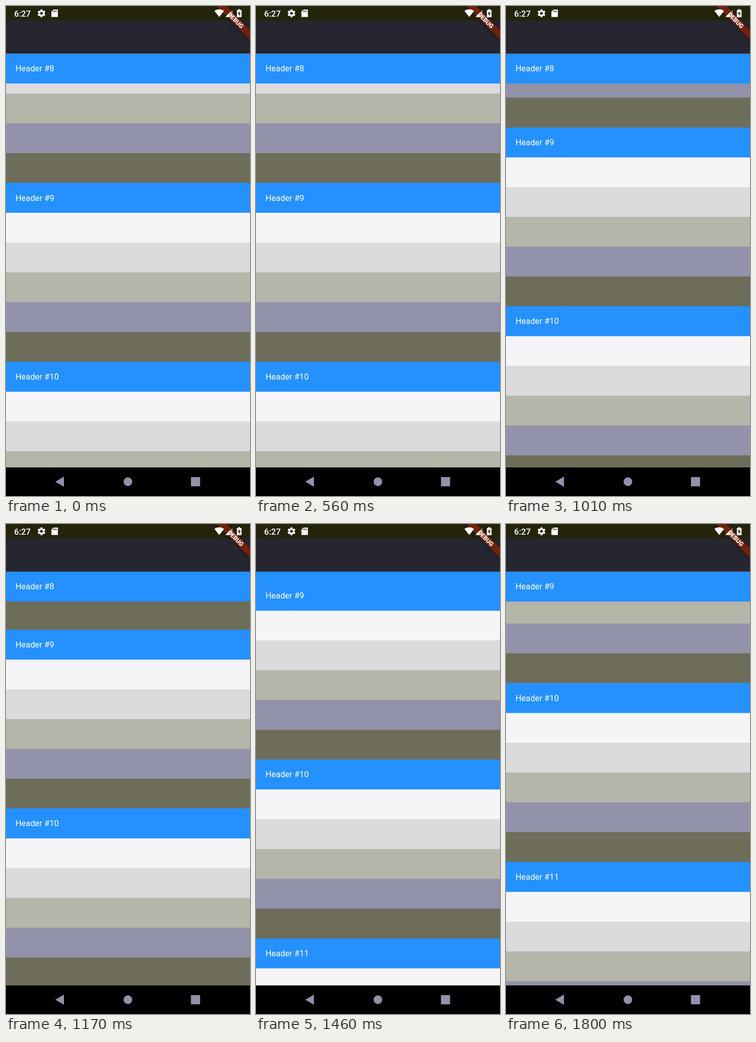
Animation of 480x960 px, one loop 1920 ms. Source, as an HTML page with a canvas:

```html
<!DOCTYPE html>
<html>
<head>
<meta charset="utf-8">
<style>
html, body { margin: 0; width: 100%; height: 100%; overflow: hidden; background: #000; }
canvas { display: block; width: 480px; height: 960px; }
</style>
</head>
<body>
<canvas id="stage" width="480" height="960"></canvas>
<script>
const ctx = document.getElementById('stage').getContext('2d');
const DP = 480 / 411, ROW = 50 * DP, SECTION = 6 * ROW, TOP = 80 * DP;
const LOOP = 1920, TICK = 41.5;
const STATUS = '#24240a', ICON = '#9191aa';
const ROWS = ['#2491ff', '#f5f5f8', '#dbdbde', '#b5b5aa', '#9292aa', '#6d6d5a'];

// Drag path: time and top of header 9
const PATH = [[560, 346.7], [760, 295.2], [1010, 238], [1340, 146.7], [1590, 32], [1800, -38.6]];

function speed(i) {
  const [ta, ya] = PATH[Math.max(i - 1, 0)];
  const [tb, yb] = PATH[Math.min(i + 1, PATH.length - 1)];
  return (yb - ya) / (tb - ta);
}

// Smooth curve through the path, held for one tick at a time
function scrollAt(t) {
  const next = PATH.findIndex(([time]) => t < time);
  if (next === 0) return PATH[0][1];
  if (next < 0) return PATH[PATH.length - 1][1];
  const [t0, y0] = PATH[next - 1], [t1, y1] = PATH[next], span = t1 - t0;
  const ticks = Math.round(span / TICK);
  const u = Math.floor((t - t0) / span * ticks) / ticks, w = 1 - u;
  return w * w * (1 + 2 * u) * y0 + u * u * (1 + 2 * w) * y1
    + span * u * w * (w * speed(next - 1) - u * speed(next));
}

function rect(color, x, y, w, h) {
  ctx.fillStyle = color;
  ctx.fillRect(x, y, w, h);
}

function disc(color, x, y, r) {
  ctx.fillStyle = color;
  ctx.beginPath();
  ctx.arc(x, y, r, 0, 7);
  ctx.fill();
}

// Right triangle with its square corner at x, y
function corner(color, x, y, dx, dy) {
  ctx.fillStyle = color;
  ctx.beginPath();
  ctx.moveTo(x, y);
  ctx.lineTo(x + dx, y);
  ctx.lineTo(x, y + dy);
  ctx.fill();
}

function text(str, x, y, font, align = 'left') {
  ctx.font = font + ' Roboto, sans-serif';
  ctx.textAlign = align;
  ctx.fillStyle = '#fff';
  ctx.fillText(str, x, y);
}

function drawList(y9) {
  const topOf = n => y9 + (n - 9) * SECTION;
  for (let n = 8; n < 12; n++) {
    ROWS.forEach((color, i) => rect(color, 0, topOf(n) + i * ROW, 480, ROW + 1));
  }
  // Each header sticks to the top until the next one pushes it away
  for (let n = 8; n < 12; n++) {
    const y = Math.max(topOf(n), Math.min(TOP, topOf(n + 1) - ROW));
    rect(ROWS[0], 0, y, 480, ROW);
    text('Header #' + n, 16 * DP, y + 34.8, 14 * DP + 'px');
  }
}

function gear(x, y) {
  ctx.save();
  ctx.translate(x, y);
  disc('#fff', 0, 0, 5.8);
  for (let i = 0; i < 6; i++) {
    rect('#fff', -2, -7.7, 4, 4);
    ctx.rotate(Math.PI / 3);
  }
  disc(STATUS, 0, 0, 2.7);
  ctx.restore();
}

function sdCard(x, y) {
  rect('#fff', x, y, 12.7, 14.5);
  corner(STATUS, x, y, 4.3, 4.3);
  for (let i = 0; i < 3; i++) rect(STATUS, x + 4 + i * 2.5, y + 2, 1.3, 3);
}

function wifi(x, y) {
  ctx.fillStyle = '#fff';
  ctx.beginPath();
  ctx.moveTo(x, y);
  ctx.arc(x, y, 15, -2.25, -.89);
  ctx.fill();
}

function battery(x, y) {
  rect('#fff', x - 4.6, y - 6, 9.2, 14);
  rect('#fff', x - 2, y - 7.7, 4, 2);
  corner(STATUS, x + .5, y + 1.5, -3.4, -6);
  corner(STATUS, x - .5, y, 3.4, 6);
}

function onRibbon(paint) {
  ctx.save();
  ctx.translate(480, 0);
  ctx.rotate(Math.PI / 4);
  paint();
  ctx.restore();
}

function drawStatus() {
  rect('#262630', 0, 0, 480, TOP);
  rect(STATUS, 0, 0, 480, 24 * DP);
  text('6:27', 16, 20.5, '500 16.5px');
  gear(69.8, 14.3);
  sdCard(89.3, 7);
  onRibbon(() => {
    ctx.shadowColor = 'rgba(0,0,0,.5)';
    ctx.shadowBlur = 6 * DP;
    rect('#70220c', -40 * DP, 28 * DP, 80 * DP, 12 * DP);
  });
  wifi(419.5, 21.5);
  corner('rgba(255,255,255,.35)', 446, 21.5, -14.5, -14.5);
  corner('#fff', 440, 21.5, -8.5, -8.5);
  battery(458.8, 14);
  onRibbon(() => text('DEBUG', 0, 37.6 * DP, `900 ${10.2 * DP}px`, 'center'));
}

function drawNav() {
  rect('#000', 0, 904, 480, 56);
  corner(ICON, 114, 932, -17, -10);
  corner(ICON, 114, 932, -17, 10);
  disc(ICON, 239.8, 932, 8.5);
  rect(ICON, 363.8, 923, 18, 18);
}

const start = performance.now();
function draw() {
  drawList(scrollAt((performance.now() - start) % LOOP));
  drawStatus();
  drawNav();
  requestAnimationFrame(draw);
}
draw();
</script>
</body>
</html>
```
